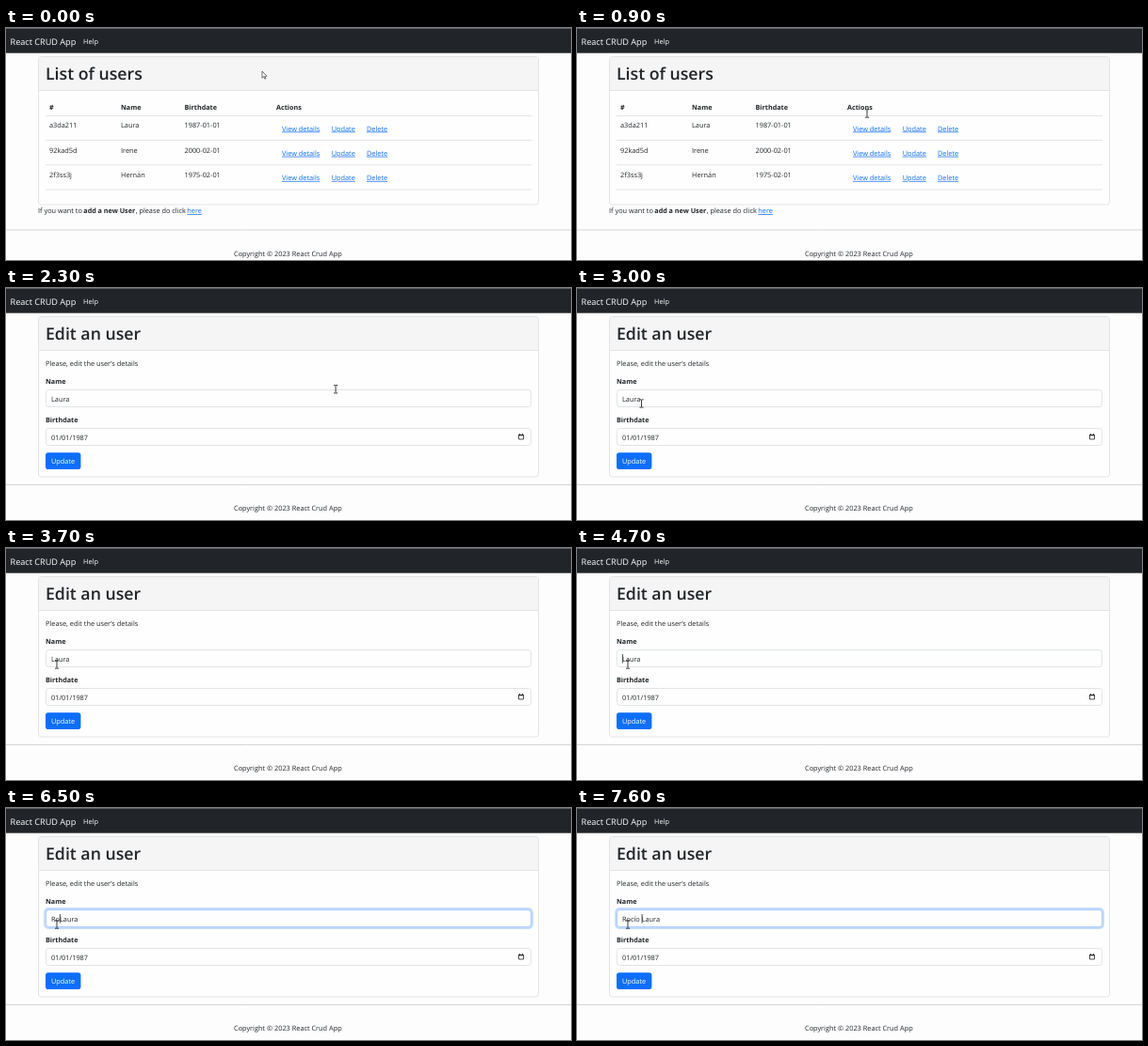
Recreate the animation shown at these times as an HTML page. Size 600 by 247 pixels, loop 8 s.

```html
<!DOCTYPE html>
<html lang="en">
<head>
<meta charset="utf-8">
<title>React CRUD App</title>
<style>
  html, body { margin: 0; width: 100%; height: 100%; overflow: hidden; background: #fdfdfe; }
  svg { display: block; width: 600px; height: 247px; }
  text { font: 7.35px "Open Sans", "Noto Sans", sans-serif; fill: #212529; white-space: pre; text-rendering: geometricPrecision; }
  .b { font-weight: 700; font-size: 7.2px; }
  .h1 { font-weight: 600; font-size: 17.7px; }
  .brand { font-size: 9.15px; }
  .w { fill: #fff; }
  .link { fill: #0d6efd; text-decoration: underline; }
  .line { stroke: #e1e4e7; }
  .box { fill: #fefefe; stroke: #e1e4e7; }
  .cursor { fill: #fff; stroke: #333; stroke-width: .7; stroke-linejoin: round; }
</style>
</head>
<body>
<svg viewBox="0 0 600 247">
  <rect width="600" height="26.7" fill="#212529"/>
  <rect width="600" height="1" fill="#5a5e61"/>
  <text x="4.5" y="17.7" class="brand w">React CRUD App</text>
  <text x="82" y="17.2" class="w">Help</text>
  <g id="list"></g>
  <g id="edit"></g>
  <g id="cursors">
    <path id="arrow" class="cursor" d="M0 0V7.2L1.7 5.7 2.8 8.2 3.9 7.7 2.8 5.3H5Z"/>
    <path id="beam" fill="none" stroke="#222" stroke-width=".9" d="M-2-4.2H-.5L0-3.8 .5-4.2H2M0-3.8V3.8M-2 4.2H-.5L0 3.8 .5 4.2H2"/>
    <path id="hand" class="cursor" d="M-.7.6Q0-.5.7.6V3.4L3.3 4Q4.2 4.3 4.1 5.2L3.4 8.6H-.4L-2.6 5.6Q-2.6 4.5-1.6 4.9L-.7 5.7Z"/>
  </g>
</svg>
<script>
const LOOP = 8000, OPEN_EDIT = 2300, FOCUS = 4700;
const $ = id => document.getElementById(id);
const text = (x, y, s, cls = '') => `<text x="${x}" y="${y}" class="${cls}">${s}</text>`;
const rule = (y, x1 = 42, x2 = 558) => `<path class="line" d="M${x1} ${y}H${x2}"/>`;
const input = y => `<rect class="box" x="42.5" y="${y}" width="515" height="18" rx="2.8"/>`;

// Card with its title, and the page footer below it
const page = (title, bottom, hr, footer) => `
  <rect class="box" x="34.5" y="30.5" width="531" height="${bottom - 30.5}" rx="3"/>
  <path fill="#f5f5f5" d="M35 66V33.5Q35 31 37.5 31H562.5Q565 31 565 33.5V66Z"/>
  ${rule(66.5, 35, 565)}${text(42, 54.8, title, 'h1')}
  <path stroke="#d3d4d5" d="M0 ${hr}H600"/>
  ${text(242, footer, 'Copyright © 2023 React Crud App')}`;

const users = [
  ['a3da211', 'Laura', '1987-01-01'],
  ['92kad5d', 'Irene', '2000-02-01'],
  ['2f3ss3j', 'Hernán', '1975-02-01']
];
const columns = [46, 122, 189.5, 287];
const row = (user, i) => {
  const y = 106.3 + i * 26.2;
  return user.map((s, c) => text(columns[c], y, s)).join('') +
    text(293, y + 3.2, 'View details', 'link') +
    text(345.7, y + 3.2, 'Update', 'link') +
    text(383, y + 3.2, 'Delete', 'link') +
    rule(119.5 + i * 26.3);
};

$('list').innerHTML = page('List of users', 188, 215, 243) +
  ['#', 'Name', 'Birthdate', 'Actions'].map((s, c) => text(columns[c], 86.6, s, 'b')).join('') +
  rule(93.5) + users.map(row).join('') +
  text(34, 197.2, 'If you want to ') + text(82.3, 197.2, 'add a new User', 'b') +
  text(137.7, 197.2, ', please do click ') + text(192.3, 197.2, 'here', 'link');

$('edit').innerHTML = page('Edit an user', 201, 209.5, 237.4) +
  text(42, 82.6, 'Please, edit the user’s details') +
  text(42, 101.8, 'Name', 'b') + input(108.5) +
  `<g id="focus" fill="none">
    <rect x="41.2" y="107.2" width="517.6" height="20.6" rx="4" stroke="#c2dbfe" stroke-width="2.2"/>
    <rect x="42.5" y="108.5" width="515" height="18" rx="2.8" stroke="#9ec5fe" stroke-width=".7"/>
  </g>
  <text x="48" y="120.7"><tspan id="typed"></tspan><tspan>Laura</tspan></text>
  <path id="caret" d="M0 113V122.5" stroke="#222" stroke-width=".8"/>` +
  text(42, 143, 'Birthdate', 'b') + input(149.5) + text(48, 161.7, '01/01/1987') +
  `<path d="M544.5 156.5H549.5V161H544.5Z" fill="none" stroke="#222" stroke-width=".8"/>
  <path d="M544.2 156.8H549.8M545.5 155.2V156M548.5 155.2V156" stroke="#222"/>
  <rect x="42" y="175.2" width="37.4" height="17.8" rx="2.8" fill="#0d6efd"/>` +
  text(48, 186.8, 'Update', 'w');

// Pointer stops: time, x, y
const path = [[0, 272, 46], [500, 272, 46], [900, 308, 91], [1400, 363, 107],
  [2200, 363, 107], [3000, 68.5, 123], [3700, 54, 124], [LOOP, 54, 124]];
// Times at which each letter is typed
const keys = [[5900, 'R'], [6500, 'o'], [6700, 'c'], [7100, 'í'], [7300, 'o'], [7500, ' ']];

function pointer(t) {
  const i = path.findIndex(p => p[0] > t);
  const [t0, x0, y0] = path[i - 1], [t1, x1, y1] = path[i];
  const k = (t - t0) / (t1 - t0), e = k * k * (3 - 2 * k);
  return [x0 + (x1 - x0) * e, y0 + (y1 - y0) * e];
}

function shape(x, y, editing) {
  if (editing) return 'beam';
  if (x > 345 && x < 371 && y > 102 && y < 112) return 'hand';
  return x > 287 && x < 315 && y > 78 && y < 92 ? 'beam' : 'arrow';
}

const show = (id, on) => $(id).style.display = on ? '' : 'none';

function draw(t) {
  const editing = t >= OPEN_EDIT;
  show('list', !editing);
  show('edit', editing);

  const [x, y] = pointer(t), kind = shape(x, y, editing);
  $('cursors').setAttribute('transform', `translate(${x} ${y})`);
  for (const id of ['arrow', 'beam', 'hand']) show(id, id === kind);

  if (editing) {
    const done = keys.filter(k => k[0] <= t);
    $('typed').textContent = done.map(k => k[1]).join('');
    $('focus').style.opacity = Math.min(1, Math.max(0, (t - FOCUS) / 150));
    const since = t - (done.length ? done.at(-1)[0] : FOCUS);
    show('caret', since >= 0 && since % 1040 < 520);
    const width = done.length ? $('typed').getComputedTextLength() : 0;
    $('caret').setAttribute('transform', `translate(${48.4 + width} 0)`);
  }
}

function tick() {
  draw(performance.now() % LOOP);
  requestAnimationFrame(tick);
}
tick();
</script>
</body>
</html>
```
